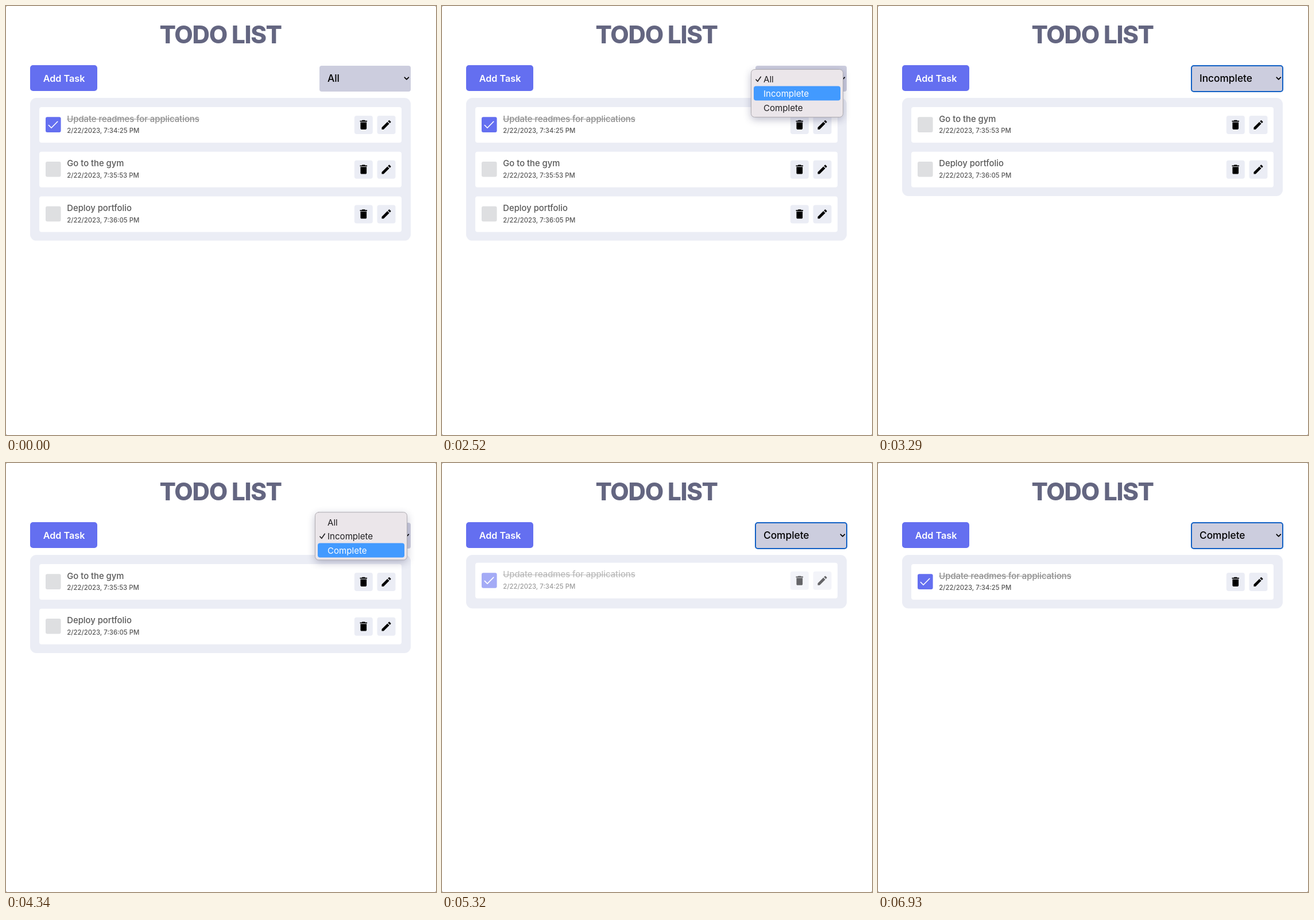
These frames come from a looping animation (749x747 px, 7.21 s). An HTML page with a canvas:

```html
<!DOCTYPE html>
<html lang="en">
<head>
<meta charset="utf-8">
<title>Todo list</title>
<style>
  html, body { margin: 0; width: 100%; height: 100%; overflow: hidden; background: #fff; }
  canvas { display: block; }
</style>
</head>
<body>
<canvas id="stage" width="749" height="747"></canvas>
<script>
const ctx = document.getElementById('stage').getContext('2d');
const LOOP = 7210, STEP = 70;
const FONT = 'Inter, "Open Sans", sans-serif';
const PRIMARY = '#646ff0', PANEL = '#ebedf5', INK = '#585858';

const TRASH = new Path2D('M6 19c0 1.1.9 2 2 2h8c1.1 0 2-.9 2-2V7H6v12zM19 4h-3.5l-1-1h-5l-1 1H5v2h14V4z');
const PENCIL = new Path2D('M3 17.25V21h3.75L17.81 9.94l-3.75-3.75L3 17.25z' +
  'M20.71 7.04a.996.996 0 0 0 0-1.41l-2.34-2.34a.996.996 0 0 0-1.41 0l-1.83 1.83 3.75 3.75 1.83-1.83z');

const FILTERS = ['All', 'Incomplete', 'Complete'];
const TASKS = [
  { title: 'Update readmes for applications', time: '2/22/2023, 7:34:25 PM', done: true },
  { title: 'Go to the gym', time: '2/22/2023, 7:35:53 PM', done: false },
  { title: 'Deploy portfolio', time: '2/22/2023, 7:36:05 PM', done: false }
];

// Each menu opens, moves its highlight, blinks on the pick, then fades away.
const MENUS = [
  { open: 1750, move: 2100, pick: 2450, from: 0, to: 1 },
  { open: 3990, move: 4340, pick: 4900, from: 1, to: 2 }
];
const BLINK = 70, FADE_START = 130, FADE_END = 400, APPLY = 245;

const clamp01 = v => Math.min(1, Math.max(0, v));

function box(x, y, w, h, r, fill) {
  ctx.beginPath();
  ctx.roundRect(x, y, w, h, r);
  ctx.fillStyle = fill;
  ctx.fill();
}

function text(str, x, y, size, weight, color) {
  ctx.font = `${weight} ${size}px ${FONT}`;
  ctx.fillStyle = color;
  ctx.fillText(str, x, y);
}

function line(points, width, color) {
  ctx.beginPath();
  points.forEach(([x, y]) => ctx.lineTo(x, y));
  ctx.lineWidth = width;
  ctx.strokeStyle = color;
  ctx.stroke();
}

function iconButton(x, y, path) {
  box(x, y, 32, 32, 4, PANEL);
  ctx.save();
  ctx.translate(x + 5.3, y + 5.2);
  ctx.scale(0.89, 0.89);
  ctx.fillStyle = '#000';
  ctx.fill(path);
  ctx.restore();
}

function drawHeader() {
  ctx.textAlign = 'center';
  ctx.letterSpacing = '-1.2px';
  text('TODO LIST', 373.5, 65, 42, 800, '#646681');
  ctx.letterSpacing = '0px';
  box(42, 103, 117, 45, 5, PRIMARY);
  text('Add Task', 101, 131.7, 16.2, 600, '#fff');
  ctx.textAlign = 'left';
}

function drawSelect(label, focused) {
  box(546, 104, 159, 45, 4, '#cccdde');
  if (focused) {
    ctx.lineWidth = 2;
    ctx.strokeStyle = '#1260c4';
    ctx.stroke();
  }
  text(label, 560, 131.7, 17.3, 500, '#000');
  line([[694.3, 124.3], [697.8, 127.8], [701.3, 124.3]], 1.8, '#000');
}

function drawTask(task, y, alpha) {
  box(58, y, 631, 62, 4, '#fff');
  ctx.globalAlpha = alpha;
  box(69, y + 17.3, 26.6, 26.6, 3, task.done ? PRIMARY : '#dedfe1');
  ctx.globalAlpha = 1;
  if (task.done) line([[74.3, y + 31.5], [79, y + 36.3], [89.8, y + 25.3]], 1.6, '#fff');
  ctx.globalAlpha = alpha;
  const color = task.done ? '#8f8f8f' : INK;
  text(task.title, 106.3, y + 25.6, 14.8, 500, color);
  if (task.done) {
    ctx.fillRect(106.3, y + 20.5, ctx.measureText(task.title).width, 1);
  }
  text(task.time, 106.3, y + 45.4, 11.35, 500, INK);
  iconButton(606.8, y + 15, TRASH);
  iconButton(646.5, y + 15, PENCIL);
  ctx.globalAlpha = 1;
}

function drawList(filter, age) {
  const shown = TASKS.filter(t => filter === 0 || t.done === (filter === 2));
  box(42, 160, 663, 15.5 + shown.length * 77.7, 11, PANEL);
  // New rows fade in linearly while an underdamped spring settles them.
  const s = age / 1000, w = 18.54;
  const lift = 18 * Math.exp(-12.5 * s) * (Math.cos(w * s) + 0.674 * Math.sin(w * s));
  shown.forEach((task, i) => drawTask(task, 176 + i * 77.7 + lift, clamp01(s / 0.3)));
}

function drawMenu(menu, t) {
  const since = t - menu.pick;
  const alpha = 1 - clamp01((since - FADE_START) / (FADE_END - FADE_START));
  if (t < menu.open || alpha === 0) return;
  const top = 110 - menu.from * 24.7;
  const active = t < menu.move ? menu.from : menu.to;
  const blinking = since >= 0 && since < BLINK;

  ctx.save();
  ctx.globalAlpha = alpha;
  ctx.shadowColor = 'rgba(45,45,90,.32)';
  ctx.shadowBlur = 14;
  ctx.shadowOffsetY = 4;
  box(538.5, top + 0.5, 160, 83, 6, '#ebe6ea');
  ctx.shadowColor = 'transparent';
  ctx.lineWidth = 1;
  ctx.strokeStyle = '#b0adb2';
  ctx.stroke();

  FILTERS.forEach((name, i) => {
    const mid = top + 17.3 + i * 24.7;
    const lit = i === active && !blinking;
    const color = lit ? '#fff' : '#1f1e20';
    if (lit) box(543, mid - 12.5, 151, 25, 4, '#429aff');
    text(name, 560, mid + 5.9, 15.1, 400, color);
    if (i === menu.from) line([[547, mid + 0.8], [549.8, mid + 4], [555.3, mid - 4]], 1.6, color);
  });
  ctx.restore();
}

function draw(t) {
  ctx.fillStyle = '#777';
  ctx.fillRect(0, 0, 749, 747);
  box(0, 0, 749, 747, 2, '#fff');
  ctx.lineJoin = ctx.lineCap = 'round';

  const applied = MENUS.filter(m => t >= m.pick + APPLY).pop();
  const filter = applied ? applied.to : 0;
  const menuOpen = MENUS.some(m => t >= m.open && t < m.pick + APPLY);
  const age = filter === 2 ? t - applied.pick - APPLY : 9999;

  drawHeader();
  drawSelect(FILTERS[filter], filter > 0 && !menuOpen);
  drawList(filter, age);
  MENUS.forEach(m => drawMenu(m, t));
}

const start = performance.now();
function tick() {
  const t = (performance.now() - start) % LOOP;
  draw(Math.floor(t / STEP) * STEP);
  requestAnimationFrame(tick);
}
tick();
</script>
</body>
</html>
```
